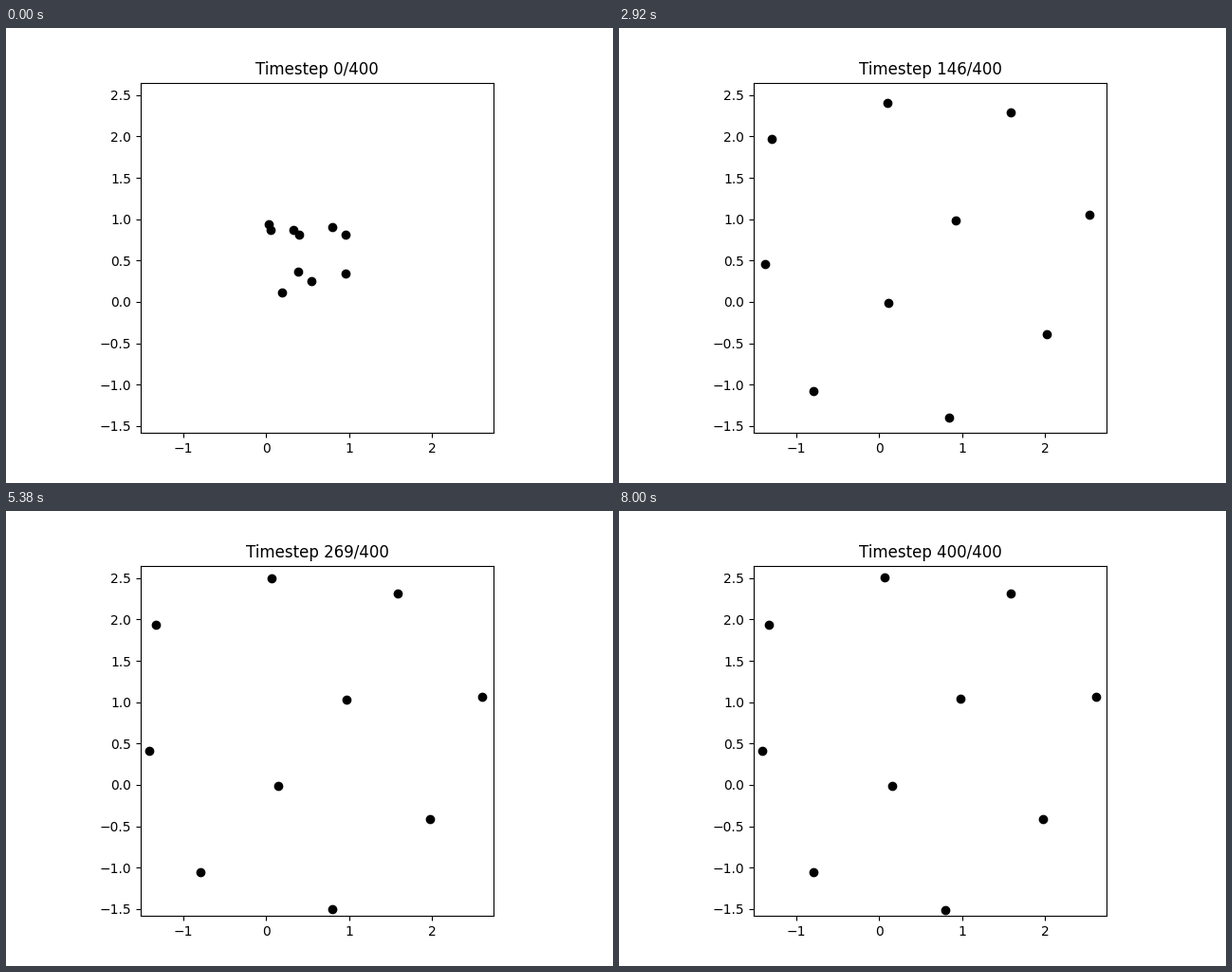
These frames come from a looping animation (640x480 px, 8.02 s). A matplotlib script:

```python
import numpy as np
import matplotlib.pyplot as plt
from matplotlib.animation import FuncAnimation

W, H, DPI = 640, 480, 100
STEPS = 400
SPREAD_END = 89          # step at which the burst outward is over
SETTLE = 60              # time constant of the slow drift afterwards
SCALE = 87.25            # pixels per data unit
X0, Y0 = 274.4, 288.9    # pixel position of the data origin
LEFT, RIGHT, TOP, BOTTOM = 141.7, 514.3, 57.6, 427.2

# Three poses of the ten particles in stage pixels: x row, y row
START = np.array([[277, 279, 303, 309, 344, 358, 358, 308, 322, 291],
                  [207, 213, 213, 218, 210, 218, 259, 257, 267, 279]])
SPREAD = np.array([[167, 160, 287, 347, 412, 486, 457, 277, 354, 205],
                   [113, 243, 94, 210, 92, 198, 320, 290, 395, 387]])
REST = np.array([[158, 151, 280, 360, 413, 503, 447, 288, 344, 205],
                 [120, 253, 70, 198, 87, 196, 325, 290, 421, 381]])


def to_data(x, y):
    return (x - X0) / SCALE, (Y0 - y) / SCALE


def burst(step):
    """Mutual repulsion: a power law of time, fast at first."""
    a, p = 0.3, 0.2
    grow = (min(step, SPREAD_END) + a) ** p - a ** p
    return grow / ((SPREAD_END + a) ** p - a ** p)


def drift(step):
    """Exponential settling into the resting lattice."""
    return 1 - np.exp(-max(step - SPREAD_END, 0) / SETTLE)


def positions(step):
    xy = START + burst(step) * (SPREAD - START) + drift(step) * (REST - SPREAD)
    return to_data(*xy)


fig = plt.figure(figsize=(W / DPI, H / DPI), dpi=DPI)
ax = fig.add_axes([LEFT / W, 1 - BOTTOM / H, (RIGHT - LEFT) / W, (BOTTOM - TOP) / H])
x_min, y_min = to_data(LEFT, BOTTOM)
x_max, y_max = to_data(RIGHT, TOP)
ax.set_xlim(x_min, x_max)
ax.set_ylim(y_min, y_max)
ax.set_xticks(range(-1, 3))
ax.set_yticks(np.arange(-1.5, 2.6, 0.5))
dots, = ax.plot([], [], "ko")
title = ax.set_title("")


def update(step):
    dots.set_data(*positions(step))
    title.set_text(f"Timestep {step}/{STEPS}")
    return dots, title


anim = FuncAnimation(fig, update, frames=STEPS + 1, interval=20,
                     repeat=True, repeat_delay=0)
plt.show()
```
